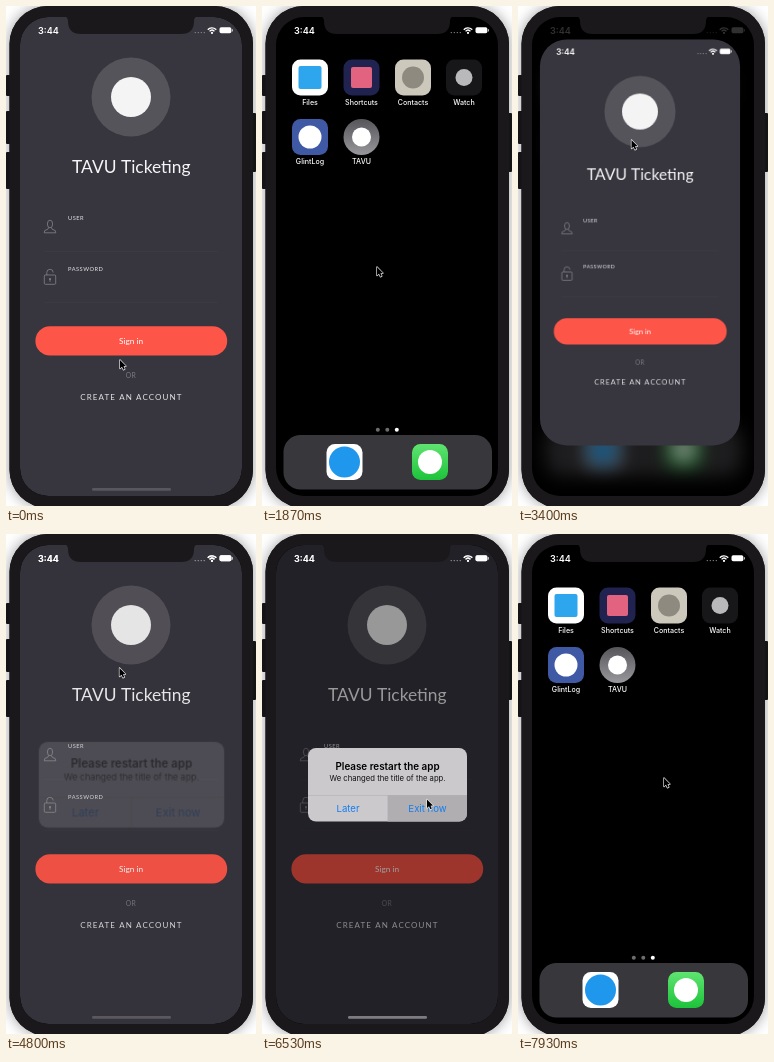
An HTML page with a canvas that plays this animation: 250x500 px, repeating every 8000 ms.

```html
<!DOCTYPE html>
<html lang="en">
<head>
<meta charset="utf-8">
<title>Phone demo</title>
<style>
html, body { margin: 0; width: 100%; height: 100%; overflow: hidden; background: #fff; }
canvas { display: block; width: 250px; height: 500px; }
</style>
</head>
<body>
<canvas id="stage"></canvas>
<script>
const W = 250, H = 500, LOOP = 8000;
const dpr = window.devicePixelRatio || 1;
const UI = 'Inter, Roboto, sans-serif', LIGHT = 'Lato, "Open Sans", sans-serif';
const FULL = { x: 14, y: 11, w: 222, h: 479, r: 28 };
const ICON = { x: 81.5, y: 113, w: 36, h: 36, r: 18 };
const HELD = { x: 52, y: 70, w: 130, h: 281, r: 10 };

const clamp = v => Math.max(0, Math.min(1, v));
const lerp = (a, b, p) => a + (b - a) * p;
const span = (t, a, b) => clamp((t - a) / (b - a));
const smooth = p => p * p * (3 - 2 * p);
const out = p => 1 - Math.pow(1 - p, 3);
const spring = x => x <= 0 ? 0 : 1 - (1 + x) * Math.exp(-x);
const mix = (a, b, p) => {
  const m = {};
  for (const k in a) m[k] = lerp(a[k], b[k], p);
  return m;
};

function setup(canvas) {
  canvas.width = W * dpr;
  canvas.height = H * dpr;
  const c = canvas.getContext('2d');
  c.scale(dpr, dpr);
  c.imageSmoothingQuality = 'high';
  return c;
}

function layer(paint) {
  const canvas = document.createElement('canvas');
  paint(setup(canvas));
  return canvas;
}

function box(c, x, y, w, h, r, fill) {
  c.beginPath();
  c.roundRect(x, y, w, h, r);
  c.fillStyle = fill;
  c.fill();
}

function disc(c, x, y, r, fill) {
  c.beginPath();
  c.arc(x, y, r, 0, 7);
  c.fillStyle = fill;
  c.fill();
}

// y is the middle of the capitals
function text(c, str, x, y, size, fill, o = {}) {
  c.font = `${o.weight || 400} ${size}px ${o.font || UI}`;
  c.letterSpacing = (o.gap || 0) + 'px';
  c.textAlign = o.align || 'center';
  c.fillStyle = fill;
  c.fillText(str, x, y + size * 0.36);
}

const phone = layer(c => {
  c.fillStyle = '#fff';
  c.fillRect(0, 0, W, H);
  c.shadowColor = 'rgba(0,0,10,0.4)';
  c.shadowBlur = 14 * dpr;
  box(c, 3.5, 0, 243.5, 502, 38, '#1a181b');
  c.shadowColor = 'transparent';
  for (const [x, y, h] of [[0, 69, 21], [0, 105, 33], [0, 146, 37], [244, 107, 59]])
    box(c, x, y, 6, h, 1, '#141316');
  box(c, 3.5, 0, 243.5, 502, 38, '#1a181b');
});

const status = layer(c => {
  text(c, '3:44', 32, 24.5, 9.1, '#fff', { weight: 600, align: 'left' });
  for (let i = 0; i < 4; i++) disc(c, 189.3 + i * 3, 26.6, 0.7, '#8d8c91');
  c.strokeStyle = '#fff';
  c.lineWidth = 1.4;
  for (const r of [3.2, 5.6]) {
    c.beginPath();
    c.arc(206, 27.5, r, -Math.PI * 0.77, -Math.PI * 0.23);
    c.stroke();
  }
  disc(c, 206, 26.9, 1.1, '#fff');
  box(c, 213.5, 21.3, 11.9, 5.9, 1.7, '#fff');
  box(c, 226, 23, 1, 2.4, 0.5, '#bbb');
});

const homeBar = (c, fill) => box(c, 86, 482, 79, 2.8, 1.4, fill);

const login = layer(c => {
  c.fillStyle = '#37353e';
  c.fillRect(0, 0, W, H);
  disc(c, 125, 91, 39.5, '#56545b');
  disc(c, 125, 91, 20, '#f4f4f5');
  text(c, 'TAVU Ticketing', 125.3, 160.4, 17.4, '#f6f6f7', { font: LIGHT });

  const label = { font: LIGHT, align: 'left', gap: 0.5 };
  text(c, 'USER', 62, 212.4, 5.7, '#e6e5e8', label);
  text(c, 'PASSWORD', 62, 263.3, 5.7, '#e6e5e8', label);
  c.fillStyle = '#3d3b44';
  c.fillRect(38, 245, 174, 0.7);
  c.fillRect(38, 296, 174, 0.7);

  c.strokeStyle = '#85838a';
  c.lineWidth = 0.8;
  c.beginPath();
  c.ellipse(44, 218, 2.6, 3.8, 0, 0, 7);
  c.moveTo(42.8, 221.4);
  c.quadraticCurveTo(42.8, 223.5, 38.8, 224.5);
  c.lineTo(38.2, 226.8);
  c.lineTo(49.8, 226.8);
  c.lineTo(49.2, 224.5);
  c.quadraticCurveTo(45.2, 223.5, 45.2, 221.4);
  c.stroke();
  c.beginPath();
  c.roundRect(38.3, 269, 11.4, 9.3, 1);
  c.moveTo(40.8, 269);
  c.lineTo(40.8, 266.5);
  c.arc(44, 266.5, 3.2, Math.PI, 0);
  c.stroke();
  disc(c, 44, 273, 1, '#85838a');
  c.fillRect(43.6, 273, 0.8, 2.8);

  box(c, 29.4, 320.3, 191.8, 29.3, 14.6, '#fe5549');
  text(c, 'Sign in', 125, 335.2, 8.3, '#fff', { font: LIGHT });
  text(c, 'OR', 125, 369.5, 6.8, '#7c7a82', { font: LIGHT, gap: 0.3 });
  text(c, 'CREATE AN ACCOUNT', 125.4, 391.5, 8, '#e4e3e6', { font: LIGHT, gap: 1.1 });
  homeBar(c, '#58565e');
});

function app(c, x, y, tile, mark, size, round, name) {
  box(c, x - 18, y - 18, 36, 36, 8.5, tile);
  box(c, x - size / 2, y - size / 2, size, size, round ? size / 2 : 2, mark);
  if (name) text(c, name, x, y + 24.7, 7.1, '#fff', { weight: 500 });
}

const home = layer(c => {
  app(c, 48, 71.5, '#fff', '#2ea6ee', 23, false, 'Files');
  app(c, 99.5, 71.5, '#20234f', '#e2637f', 21, false, 'Shortcuts');
  app(c, 151, 71.5, '#cdc8bc', '#8f8a80', 22, true, 'Contacts');
  app(c, 202, 71.5, '#17171a', '#b9b9bc', 17, true, 'Watch');
  app(c, 48, 131, '#3f59a5', '#fff', 23, true, 'GlintLog');
  const grey = c.createLinearGradient(0, 113, 0, 149);
  grey.addColorStop(0, '#55555a');
  grey.addColorStop(1, '#98989c');
  disc(c, 99.5, 131, 18, grey);
  disc(c, 99.5, 131, 9.5, '#fff');
  text(c, 'TAVU', 99.5, 155.7, 7.1, '#fff', { weight: 500 });

  ['#6d6d70', '#6d6d70', '#fff'].forEach((f, i) => disc(c, 115.8 + i * 9.5, 423.7, 2, f));
  box(c, 21.5, 429, 208.5, 54.5, 17, '#38373b');
  app(c, 82.5, 456, '#fff', '#1f97ec', 31, true);
  const green = c.createLinearGradient(0, 438, 0, 474);
  green.addColorStop(0, '#5fe470');
  green.addColorStop(1, '#1cc33a');
  app(c, 168, 456, green, '#fff', 24, true);
});

const alertBox = lit => layer(c => {
  c.beginPath();
  c.roundRect(46, 214, 159, 73.5, 8);
  c.clip();
  c.fillStyle = '#cbc9cc';
  c.fillRect(46, 214, 159, 74);
  if (lit) {
    c.fillStyle = '#b0aeb1';
    c.fillRect(126, 261, 79, 27);
  }
  c.fillStyle = '#b3b1b5';
  c.fillRect(46, 261, 159, 0.6);
  c.fillRect(125.5, 261, 0.6, 27);
  text(c, 'Please restart the app', 125.5, 232, 9.85, '#000', { weight: 600 });
  text(c, 'We changed the title of the app.', 125.5, 244.3, 7.7, '#111');
  text(c, 'Later', 86, 274.5, 9.6, '#147ef0');
  text(c, 'Exit now', 165.5, 274.5, 9.6, '#147ef0');
});
const alertIdle = alertBox(false), alertLit = alertBox(true);

// [start, end, x, y]: where the pointer goes in each span
const MOVES = [
  [70, 760, 114, 487],
  [850, 1330, 115, 261],
  [1900, 2560, 113.5, 134],
  [5570, 5960, 165, 265.5],
  [6700, 7130, 146, 244]
];

function pointer(t) {
  let x = 114, y = 354;
  for (const [a, b, tx, ty] of MOVES) {
    const p = smooth(span(t, a, b));
    x = lerp(x, tx, p);
    y = lerp(y, ty, p);
  }
  return [x, y];
}

// win: app window, alpha: its opacity, bar / outerBar: status bars, far: depth of home, zoom: its shrink
function scene(t) {
  const s = { win: FULL, alpha: 1, bar: 1, outerBar: 0, far: 1, zoom: 0.06 };
  if (t >= 850 && t < 1450) {
    const p = smooth(span(t, 850, 1330));
    s.win = mix(FULL, HELD, p);
    s.bar = 1 - 0.8 * p;
    s.zoom = lerp(0.06, 0.11, p);
  } else if (t >= 1450 && t < 3060) {
    const p = smooth(span(t, 1450, 1720));
    s.win = mix(HELD, ICON, p);
    s.alpha = 1 - span(p, 0.45, 1);
    s.bar = 0;
    s.far = 1 - out(span(t, 1450, 1865));
    s.zoom = 0.11 * s.far;
    s.outerBar = span(t, 1450, 1670);
  } else if (t >= 3060 && t < 3870) {
    const p = spring((t - 3040) * 0.0102);
    s.win = mix(ICON, FULL, p);
    const h = lerp(ICON.h, FULL.h, spring((t - 3040) * 0.009));
    s.win.y += (s.win.h - h) / 2;
    s.win.h = h;
    s.alpha = span(p, 0, 0.3);
    s.far = p;
    s.zoom = 0.065 * p;
    s.outerBar = clamp(1 - p * 0.92);
  } else if (t >= 7660) {
    const p = smooth(span(t, 7620, 7925));
    s.win = mix(FULL, ICON, p);
    s.alpha = 1 - span(p, 0.5, 1);
    s.bar = 1 - p;
    s.far = 1 - p;
    s.zoom = 0.06 * s.far;
    s.outerBar = p;
  }
  return s;
}

const ctx = setup(document.getElementById('stage'));

function put(img, alpha = 1) {
  if (alpha <= 0) return;
  ctx.globalAlpha = alpha;
  ctx.drawImage(img, 0, 0, W, H);
  ctx.globalAlpha = 1;
}

function zoomAt(x, y, k) {
  ctx.translate(x, y);
  ctx.scale(k, k);
  ctx.translate(-x, -y);
}

function drawHome(s) {
  ctx.save();
  zoomAt(125, 250, 1 - s.zoom);
  if (s.far > 0.01) ctx.filter = `blur(${9.5 * s.far * dpr}px)`;
  put(home, 1 - 0.55 * s.far);
  ctx.restore();
  put(status, s.outerBar);
}

function drawWindow({ win, alpha, bar }) {
  if (alpha <= 0) return;
  ctx.save();
  ctx.beginPath();
  ctx.roundRect(win.x, win.y, win.w, win.h, Math.min(win.r, win.w / 2));
  ctx.clip();
  const k = win.w / FULL.w;
  ctx.translate(win.x, win.y);
  ctx.scale(k, k);
  ctx.translate(-FULL.x, -FULL.y);
  put(login, alpha);
  put(status, bar * alpha);
  ctx.restore();
}

function drawAlert(t) {
  if (t < 4790 || t > 7110) return;
  const p = t > 5400 ? 1 : spring((t - 4735) * 0.0112);
  const a = p * (1 - smooth(span(t, 6630, 7100)));
  ctx.fillStyle = `rgba(0,0,0,${0.38 * a})`;
  ctx.fillRect(0, 0, W, H);
  // system bars stay above the dimming
  put(status);
  homeBar(ctx, `rgba(125,122,128,${a})`);
  ctx.save();
  zoomAt(125.5, 250.7, 1.2 - 0.2 * p);
  put(t >= 6500 && t < 6900 ? alertLit : alertIdle, a);
  ctx.restore();
}

function drawNotch() {
  ctx.beginPath();
  ctx.moveTo(58, 10);
  ctx.quadraticCurveTo(62, 11, 62, 15);
  ctx.quadraticCurveTo(62, 28, 75, 28);
  ctx.lineTo(175, 28);
  ctx.quadraticCurveTo(188, 28, 188, 15);
  ctx.quadraticCurveTo(188, 11, 192, 10);
  ctx.fillStyle = '#1a181b';
  ctx.fill();
}

function drawPointer([x, y]) {
  ctx.beginPath();
  ctx.moveTo(x, y);
  [[0, 8.6], [2, 6.8], [3.4, 9.8], [4.8, 9.1], [3.5, 6.2], [6, 6.1]]
    .forEach(([dx, dy]) => ctx.lineTo(x + dx, y + dy));
  ctx.closePath();
  ctx.lineJoin = 'round';
  ctx.lineWidth = 1.3;
  ctx.strokeStyle = '#eee';
  ctx.stroke();
  ctx.fillStyle = '#000';
  ctx.fill();
}

function draw(t) {
  const s = scene(t);
  put(phone);
  ctx.save();
  ctx.beginPath();
  ctx.roundRect(FULL.x, FULL.y, FULL.w, FULL.h, FULL.r);
  ctx.clip();
  ctx.fillStyle = '#000';
  ctx.fillRect(0, 0, W, H);
  if (s.win !== FULL) drawHome(s);
  drawWindow(s);
  drawAlert(t);
  ctx.restore();
  drawNotch();
  drawPointer(pointer(t));
}

const start = performance.now();
function tick() {
  draw((performance.now() - start) % LOOP);
  requestAnimationFrame(tick);
}
tick();
</script>
</body>
</html>
```
